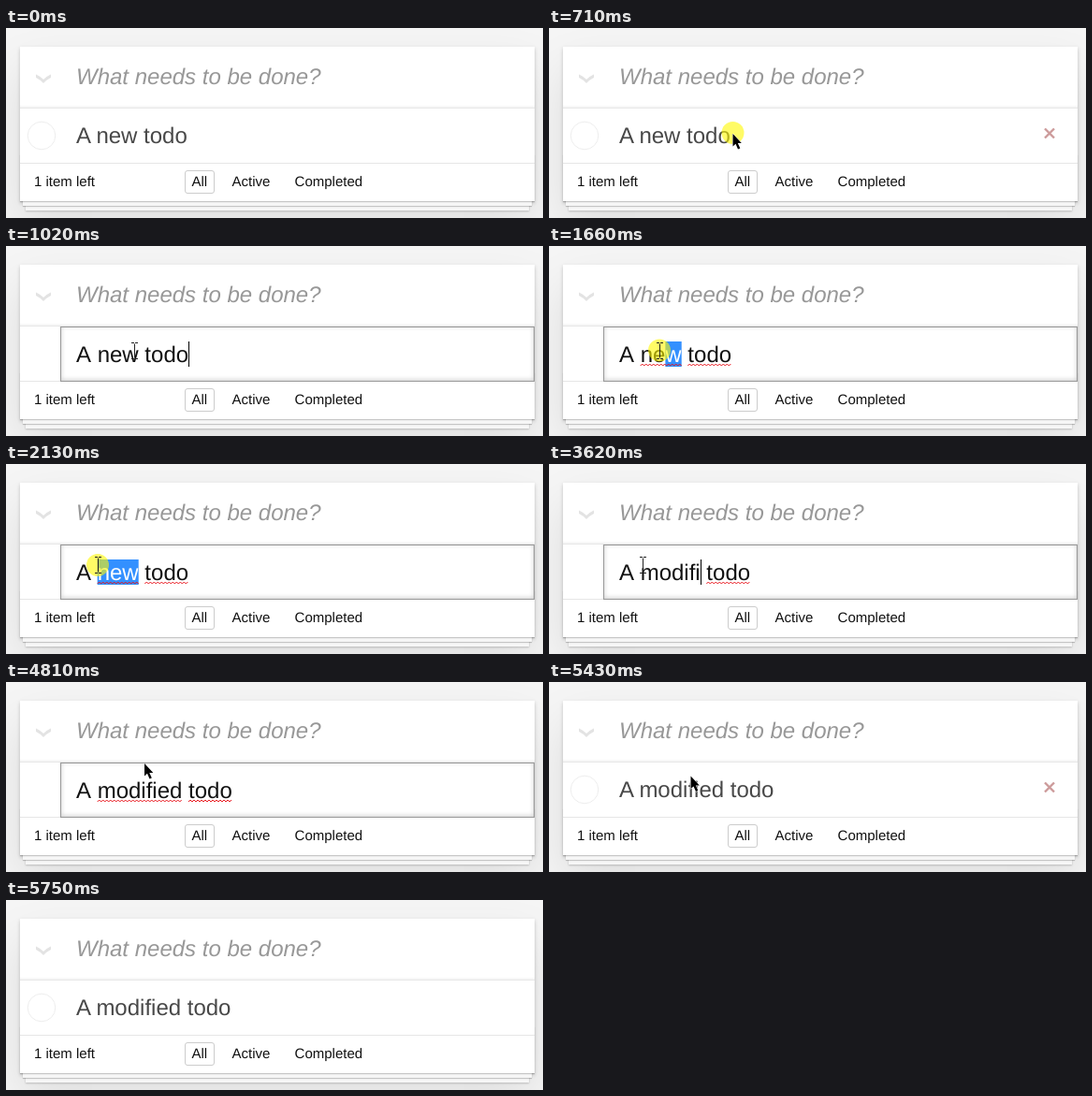
An HTML page with a canvas for the animation above (6.84 s loop, 574 px wide and 203 px high).

```html
<!DOCTYPE html>
<html lang="en">
<head>
<meta charset="utf-8">
<title>Todo editing</title>
<style>
html, body { margin: 0; width: 100%; height: 100%; overflow: hidden; background: #f5f5f5; }
body {
  position: relative; color: #111; font: 15px/17px "Liberation Sans", Arial, sans-serif;
  text-rendering: geometricPrecision; font-kerning: none;
}
body > *, .card * { position: absolute; white-space: nowrap; box-sizing: border-box; }
.card {
  left: 15px; top: 20px; width: 550px; height: 165px; background: #fff;
  box-shadow: 0 2px 4px rgba(0,0,0,.2), 0 25px 50px rgba(0,0,0,.1);
}
.head { width: 550px; height: 65px; box-shadow: inset 0 -2px 1px rgba(0,0,0,.03); }
.hint { left: 60px; top: 19px; font: italic 24px/27px "Liberation Sans", Arial, sans-serif; color: #989898; }
.line { width: 550px; height: 1px; background: #e6e6e6; }
.stack {
  bottom: 0; width: 550px; height: 50px;
  box-shadow: 0 1px 1px rgba(0,0,0,.2), 0 8px 0 -3px #f6f6f6, 0 9px 1px -3px rgba(0,0,0,.2),
    0 16px 0 -6px #f6f6f6, 0 17px 2px -6px rgba(0,0,0,.2);
}
.foot { top: 136px; }
.on { left: 176px; top: 132px; width: 32px; height: 25px; border: 1px solid #ccc; border-radius: 3px; }
#edit {
  left: 43px; top: 66px; width: 507px; height: 59px; background: #fff;
  border: 1px solid #999; box-shadow: inset 0 -1px 5px rgba(0,0,0,.2);
}
canvas { left: 0; top: 0; }
</style>
</head>
<body>
<div class="card">
  <div class="stack"></div>
  <div class="head"></div>
  <div class="hint">What needs to be done?</div>
  <div class="line" style="top:65px"></div>
  <div class="line" style="top:124px"></div>
  <span class="foot" style="left:15px">1 item left</span>
  <div class="on"></div>
  <span class="foot" style="left:183.5px">All</span>
  <span class="foot" style="left:226.6px">Active</span>
  <span class="foot" style="left:293.6px">Completed</span>
  <div id="edit"></div>
</div>
<canvas id="stage" width="574" height="203"></canvas>
<script>
const LOOP = 6840, STEP = 80, LEFT = 75;
const OPEN = 790, PRESS = 1340, BLUR = 4490, SAVE = 4890;
const KEYS = [2910, 3150, 3150, 3380, 3460, 3620, 3700, 3780];
const CLICKS = [[710, 790], [PRESS, 2290], [BLUR, 4570]];
// start time, steps, end x, end y
const MOVES = [
  [70, 8, 196.5, 113], [940, 1, 123, 112], [1020, 1, 137, 112],
  [1420, 4, 118, 111.5], [1740, 1, 107, 110.5], [1890, 4, 98, 108],
  [2210, 1, 100, 108], [4330, 2, 148, 87], [5430, 4, 172, 180]
];
const ARROW = new Path2D('M0 0V13.5L3 10.8L5.5 16.5L7.8 15.5L5.3 10H9.3Z');
const CHEVRON = new Path2D('M32 49.5Q36.5 51.5 40 55Q43.5 51.5 48 49.5V53Q43 55.5 40 59Q37 55.5 32 53Z');

const c = document.getElementById('stage').getContext('2d');
const edit = document.getElementById('edit');
c.font = '24px "Liberation Sans", Arial, sans-serif';
c.fontKerning = 'none';
c.textRendering = 'geometricPrecision';
const width = s => c.measureText(s).width;

function text(s, x, y, color) {
  c.fillStyle = color;
  c.fillText(s, x, y);
}

function stroke(color, size, ...lines) {
  c.strokeStyle = color;
  c.lineWidth = size;
  c.beginPath();
  for (const [x1, y1, x2, y2] of lines) {
    c.moveTo(x1, y1);
    c.lineTo(x2, y2);
  }
  c.stroke();
}

function disc(x, y, r) {
  c.beginPath();
  c.arc(x, y, r, 0, 7);
}

function squiggle(x, w) {
  c.strokeStyle = '#e8141c';
  c.lineWidth = 1;
  c.beginPath();
  for (let i = 0; i <= w; i += 2) c.lineTo(x + i, i % 4 ? 126 : 128);
  c.stroke();
}

function caret(x) {
  c.fillStyle = '#000';
  c.fillRect(Math.round(x), 102, 1, 27);
}

function pointer(t) {
  let x = 225, y = 205;
  for (const [start, steps, x1, y1] of MOVES) {
    if (t < start) break;
    const k = Math.min(1, (Math.floor((t - start) / STEP) + 1) / steps);
    const p = (1 - Math.cos(Math.PI * k)) / 2;
    x += (x1 - x) * p;
    y += (y1 - y) * p;
  }
  return { x, y };
}

function drawLabel(word, hover) {
  text('A', LEFT, 123, '#484848');
  text(word + ' todo', LEFT + width('A ') - 1.3, 123, '#484848');
  disc(38, 115, 14.8);
  c.strokeStyle = '#ededed';
  c.lineWidth = 1;
  c.stroke();
  if (hover) stroke('#cc9a9a', 2.4, [530, 107.5, 540, 117.5], [540, 107.5, 530, 117.5]);
}

function drawEdit(t, word, x) {
  const from = LEFT + width('A '), to = from + width(word), last = to + width(' ');
  text('A ' + word + ' todo', LEFT, 124, '#111');
  if (t >= PRESS && t < KEYS[0]) {
    const edges = [0, 1, 2, 3].map(i => from + width(word.slice(0, i)));
    const i = edges.findIndex((e, n) => n === 3 || x < (e + edges[n + 1]) / 2);
    if (i < 3) {
      c.fillStyle = '#3390ff';
      c.fillRect(edges[i], 102, to - edges[i], 27);
      text(word.slice(i), edges[i], 124, '#fff');
    }
  }
  if (t >= PRESS) squiggle(last, width('todo'));
  if (t >= PRESS && t < KEYS[0] || t >= BLUR) squiggle(from, to - from);
  if (t < PRESS) caret(last + width('todo'));
  if (t >= KEYS[0] && t < BLUR) caret(to);
}

function drawPointer(t, x, y) {
  if (CLICKS.some(([a, b]) => t >= a && t < b)) {
    disc(x, y - (t < OPEN ? 1 : 0), 12);
    c.fillStyle = 'rgba(255,248,0,.6)';
    c.fill();
  }
  if (t < OPEN || t >= 4410) {
    c.save();
    c.translate(x, y);
    c.strokeStyle = '#fff';
    c.lineWidth = 1;
    c.stroke(ARROW);
    c.fillStyle = '#000';
    c.fill(ARROW);
    c.restore();
  } else {
    const px = Math.floor(x) + .5, top = Math.round(y) - 8.5, end = top + 17;
    stroke('#222', 1, [px, top + 1, px, end - 1],
      [px - 3.5, top, px - .5, top], [px + .5, top, px + 3.5, top],
      [px - 3.5, end, px - .5, end], [px + .5, end, px + 3.5, end]);
  }
}

function draw(t) {
  const { x, y } = pointer(t);
  const visible = t >= 70 && t < 5750;
  const editing = t >= OPEN && t < SAVE;
  const typed = KEYS.filter(k => k <= t).length;
  const word = typed ? 'modified'.slice(0, typed) : 'new';
  c.clearRect(0, 0, 574, 203);
  c.fillStyle = '#e3e3e3';
  c.fill(CHEVRON);
  edit.style.display = editing ? 'block' : 'none';
  if (editing) drawEdit(t, word, x);
  else drawLabel(word, visible && y < 145);
  if (visible) drawPointer(t, x, y);
}

const begin = performance.now();
function tick() {
  draw((performance.now() - begin) % LOOP);
  requestAnimationFrame(tick);
}
tick();
</script>
</body>
</html>
```
